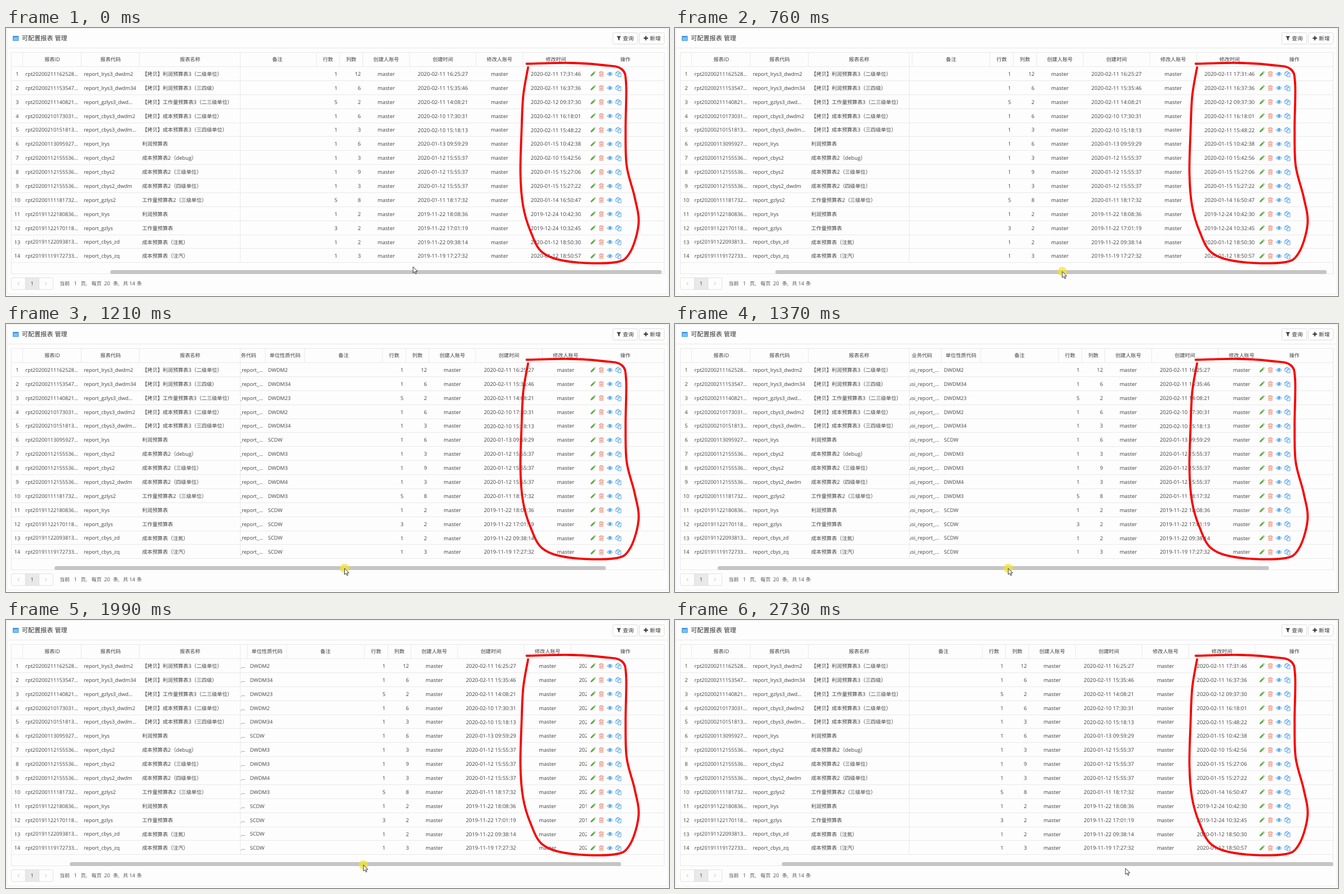
Recreate the animation shown at these times as an HTML page. Size 1176 by 476 pixels, loop 2.8 s.

```html
<!DOCTYPE html>
<html lang="zh-CN">
<head>
<meta charset="utf-8">
<title>可配置报表 管理</title>
<style>
  html, body { margin: 0; width: 100%; height: 100%; overflow: hidden; background: #fdfdfd; }
  svg { display: block; width: 1176px; height: 476px; }
  text { font-family: "Open Sans", "Noto Sans CJK SC", "Noto Sans CJK", "Noto Sans", sans-serif; fill: #404040; text-rendering: geometricPrecision; white-space: pre; }
  .line { stroke: #e9e9e9; fill: none; }
  .icon { fill: none; stroke-linecap: round; stroke-linejoin: round; }
  .red { fill: none; stroke: #f80000; stroke-width: 3.8; stroke-linecap: round; stroke-linejoin: round; }
</style>
</head>
<body>
<svg id="stage" viewBox="0 0 1176 476" xmlns="http://www.w3.org/2000/svg"></svg>
<script>
const LOOP = 2800, RATIO = 1.185, HOME = 60;
const USER = 'master';
const KINDS = { l: ['lrys', '利润'], g: ['gzlys', '工作量'], c: ['cbys', '成本'] };

// kind + version | code suffix ("+" means the unit) | note | unit | rows | cols | created | id seconds | modified
const rows = `l3|+|二级单位|2|1|12|20200211162527|28|20200211173146
l3|+|三四级|34|1|6|20200211153546|47|20200211163736
g3|_dwd...|二三级单位|23|5|2|20200211140821|21|20200212093730
c3|+|二级单位|2|1|6|20200210173031|31|20200211161801
c3|_dwdm...|三四级单位|34|1|3|20200210151813|13|20200211154822
l||||1|6|20200113095929|27|20200115104238
c2||debug|3|1|3|20200112155537|36|20200210154256
c2||三级单位|3|1|9|20200112155537|36|20200115152706
c2|_dwdm|四级单位|4|1|3|20200112155537|36|20200115152722
g2||三级单位|3|5|8|20200111181732|32|20200114165047
l||||1|2|20191122180836|36|20191224104230
g||||3|2|20191122170119|18|20191224103245
c|_zd|注氮||1|2|20191122093814|13|20200112185030
c|_zq|注汽||1|3|20191119172732|33|20200112185057`.split('\n').map(parse);

function stamp(s) {
  return s.replace(/(....)(..)(..)(..)(..)(..)/, '$1-$2-$3 $4:$5:$6');
}

function parse(src) {
  const [[kind, ver = ''], suffix, note, unit, lines, cols, made, sec, changed] = src.split('|');
  const [code, noun] = KINDS[kind];
  return {
    id: `rpt${made.slice(0, 12)}${sec}...`,
    code: `report_${code}${ver}${suffix === '+' ? '_dwdm' + unit : suffix}`,
    name: `${ver === '3' ? '【拷贝】' : ''}${noun}预算表${ver}${note && `（${note}）`}`,
    unit: unit ? 'DWDM' + unit : 'SCDW',
    lines, cols, made: stamp(made), changed: stamp(changed)
  };
}

// Text centred vertically on y; CJK runs are set slightly smaller.
function text(x, y, str, anchor = 'start', size = 9.35, fill = '') {
  const body = str.replace(/[^\x00-\x7f]+/g, m => `<tspan font-size="${size * 0.975}">${m}</tspan>`);
  return `<text x="${x}" y="${y + size * 0.36}" font-size="${size}" text-anchor="${anchor}"${fill && ` style="fill:${fill}"`}>${body}</text>`;
}
const mid = (x, y, str, size, fill) => text(x, y, str, 'middle', size, fill);
const line = (x1, y1, x2, y2) => `<path class="line" d="M${x1} ${y1}L${x2} ${y2}"/>`;
const box = (x, y, w, h, fill, rx = 0, stroke = '#e2e2e2') =>
  `<rect x="${x}" y="${y}" width="${w}" height="${h}" rx="${rx}" fill="${fill}" stroke="${stroke}"/>`;

const HEAD_Y = 56, rowY = i => 81.6 + i * 24.88;

function frame() {
  let s = box(9.5, 43.5, 1158, 393, '#fdfdfd', 0, '#e9e9e9');
  for (let i = 0; i <= rows.length; i++) {
    const y = Math.round(69 + i * 24.88) - .5;
    s += line(9, y, 1168, y);
  }
  return s;
}

function fixedLeft() {
  let s = [30, 134, 237].map(x => line(x - .5, 43, x - .5, 69)).join('');
  s += line(415.5, 43, 415.5, 417);
  s += mid(82, HEAD_Y, '报表ID') + mid(185.5, HEAD_Y, '报表代码') + mid(326.5, HEAD_Y, '报表名称');
  rows.forEach((r, i) => {
    const y = rowY(i);
    s += mid(20, y, String(i + 1)) + text(34.5, y, r.id, 'start', 9.2)
       + text(138, y, r.code, 'start', 9.17) + text(241.5, y, r.name);
  });
  return s;
}

function scrolled() {
  const edges = [422, 491, 560.5, 698.5, 740, 781, 864, 982, 1065, 1182];
  const heads = ['业务代码', '单位性质代码', '备注', '行数', '列数', '创建人账号', '创建时间', '修改人账号', '修改时间'];
  const centre = k => (edges[k] + edges[k + 1]) / 2;
  let s = edges.map(x => line(x, 43, x, 69)).join('');
  heads.forEach((h, k) => s += mid(centre(k), HEAD_Y, h));
  rows.forEach((r, i) => {
    const y = rowY(i);
    s += text(427, y, 'busi_report_...', 'start', 9.15) + text(495.5, y, r.unit, 'start', 9.1)
       + text(736, y, r.lines, 'end') + text(777.5, y, r.cols, 'end')
       + mid(centre(5), y, USER) + mid(centre(6), y, r.made, 9.45)
       + mid(centre(7), y, USER) + mid(centre(8), y, r.changed, 9.45);
  });
  return s;
}

function actions(y) {
  const at = (x, body) => `<g transform="translate(${x} ${y})">${body}</g>`;
  return at(1041, '<path d="M-4.2 4.2L-3.6 1.4L1.4 -3.6L3.6 -1.4L-1.4 3.6ZM2 -4.1L3.2 -4.9L4.9 -3.2L4.1 -2Z" fill="#5fae45"/>')
    + at(1056, '<path class="icon" stroke="#ea8672" stroke-width=".9" d="M-4 -2.8H4M-1.6 -3V-4.3H1.6V-3M-3.1 -2.6V4.3H3.1V-2.6M-1.4 -.8V2.5M0 -.8V2.5M1.4 -.8V2.5"/>')
    + at(1071.2, '<path class="icon" stroke="#3f9ae8" d="M-4.7 .2Q0 -6.2 4.7 .2Q0 6 -4.7 .2Z"/><circle cy="-.3" r="2.3" fill="#3f9ae8"/><circle cx="-.6" cy="-1" r=".7" fill="#fff"/>')
    + at(1086.2, '<path class="icon" stroke="#3f9ae8" stroke-width=".9" d="M-.6 2.6H-4.5V-2L-2 -4.5H1V-2.2M-4.5 -1.9H-1.9V-4.5M-.6 4.6V.1L1.9 -2.3H4.6V4.6ZM-.6 .2H2V-2.3"/>');
}

function toolbar() {
  return box(1.5, .5, 1173, 472, '#fdfdfd', 3, '#ececec') + line(2, 35.5, 1174, 35.5)
    + '<rect x="12" y="14" width="10.5" height="9" rx="1" fill="#3c97e6"/><path d="M13.2 17.3H21.4M13.2 19.3H21.4M13.2 21.3H21.4" stroke="#d8ebfb" stroke-width=".9"/>'
    + text(28, 18.3, '可配置报表 管理', 'start', 11.4, '#333')
    + box(1076.5, 8.5, 44, 20, '#fff', 2, '#dcdcdc') + box(1123.5, 8.5, 44, 20, '#fff', 2, '#dcdcdc')
    + '<path d="M1083.2 14.5H1091L1088.2 18V22.3L1086 20.8V18Z" fill="#333"/>'
    + '<path d="M1131.2 18H1138.8M1135 14.2V21.8" stroke="#333" stroke-width="2"/>'
    + text(1094, 18.2, '查询', 'start', 9.9, '#333') + text(1142, 18.2, '新增', 'start', 9.9, '#333');
}

function pager() {
  const arrow = (x, d) => `<path class="icon" stroke="#c4c4c4" d="M${x + d} 451.5L${x - d} 454L${x + d} 456.5"/>`;
  const parts = [[95, '当前'], [120.5, '1'], [132.5, '页,'], [151.5, '每页'], [174, '20'], [190, '条,'], [207.5, '共'], [218.5, '14'], [232, '条']];
  return box(9.5, 443.5, 74, 21, '#fdfdfd', 2) + box(34.5, 443.5, 24, 21, '#e9e9e9', 0, '#dedede')
    + arrow(22, 1.3) + arrow(71, -1.3) + mid(46.5, 454, '1')
    + parts.map(([x, t]) => text(x, 454, t, 'start', 9.35, '#555')).join('');
}

// Smooth hand-drawn stroke through a few points.
function marker() {
  const p = [[923.5, 63.5], [1000, 62], [1060, 66], [1092, 73], [1100, 100], [1099, 180], [1101, 245],
    [1115, 300], [1122, 348], [1106, 400], [1078, 416.5], [1000, 415], [952, 399], [930, 360],
    [917, 315], [912.5, 258], [914.5, 182], [917.5, 120], [926, 70]];
  let d = `M${p[0]}`;
  for (let i = 0; i < p.length - 1; i++) {
    const a = p[i - 1] || p[i], b = p[i], c = p[i + 1], e = p[i + 2] || c;
    const out = [0, 1].map(k => b[k] + (c[k] - a[k]) / 6);
    const into = [0, 1].map(k => c[k] - (e[k] - b[k]) / 6);
    d += `C${out} ${into} ${c}`;
  }
  return `<path class="red" d="${d}"/>`;
}

document.getElementById('stage').innerHTML =
  '<defs><clipPath id="view"><rect x="416" y="43" width="614" height="375"/></clipPath></defs>'
  + toolbar() + frame() + fixedLeft()
  + `<g clip-path="url(#view)"><g id="cells">${scrolled()}</g></g>`
  + mid(1098.5, HEAD_Y, '操作') + rows.map((r, i) => actions(rowY(i))).join('')
  + '<rect id="thumb" y="430" width="978" height="7" rx="3.5" fill="#c5c5c5"/>'
  + pager() + marker()
  + '<circle id="halo" r="8.2" fill="#f2e52c" opacity=".72"/>'
  + '<path id="cursor" fill="#fff" stroke="#222" stroke-width=".9" stroke-linejoin="round" d="M0 0V11L2.6 8.7L4.4 12.7L6.1 12L4.4 8.1H7.9Z"/>';

// first step, last step, step count, then the pose reached: thumb x, pointer x, pointer y, button held
const moves = [
  [80, 200, 3, 185, 706, 429, 0],
  [370, 410, 2, 185, 701, 432.5, 0],
  [690, 760, 2, 178, 687, 432.5, 1],
  [820, 1210, 7, 86, 600.5, 434, 1],
  [1290, 1580, 5, 60, 577, 434, 1],
  [1850, 1990, 3, 113, 634, 435, 1],
  [2060, 2190, 3, 159, 681.5, 435, 1],
  [2260, 2320, 2, 189.5, 714, 436, 1],
  [2390, 2730, 6, 189.5, 799, 441, 0]
];

function poseAt(t) {
  let pose = [185, 722, 424, 0];
  for (const [from, to, count, ...goal] of moves) {
    if (t < from) break;
    const gap = (to - from) / (count - 1);
    const done = Math.min(count, Math.floor((t - from) / gap + 1e-6) + 1) / count;
    pose = goal.map((g, k) => k === 3 ? g : pose[k] + (g - pose[k]) * done);
  }
  return pose;
}

const [cells, thumb, halo, cursor] = ['cells', 'thumb', 'halo', 'cursor'].map(id => document.getElementById(id));
const move = (el, x, y) => el.setAttribute('transform', `translate(${x} ${y})`);

function draw(t) {
  const [bar, x, y, held] = poseAt(t);
  move(cells, (HOME - bar) * RATIO, 0);
  thumb.setAttribute('x', bar);
  move(cursor, x, y);
  move(halo, x, y);
  halo.setAttribute('visibility', held ? 'visible' : 'hidden');
}

const start = performance.now();
function tick() {
  draw((performance.now() - start) % LOOP);
  requestAnimationFrame(tick);
}
tick();
</script>
</body>
</html>
```
